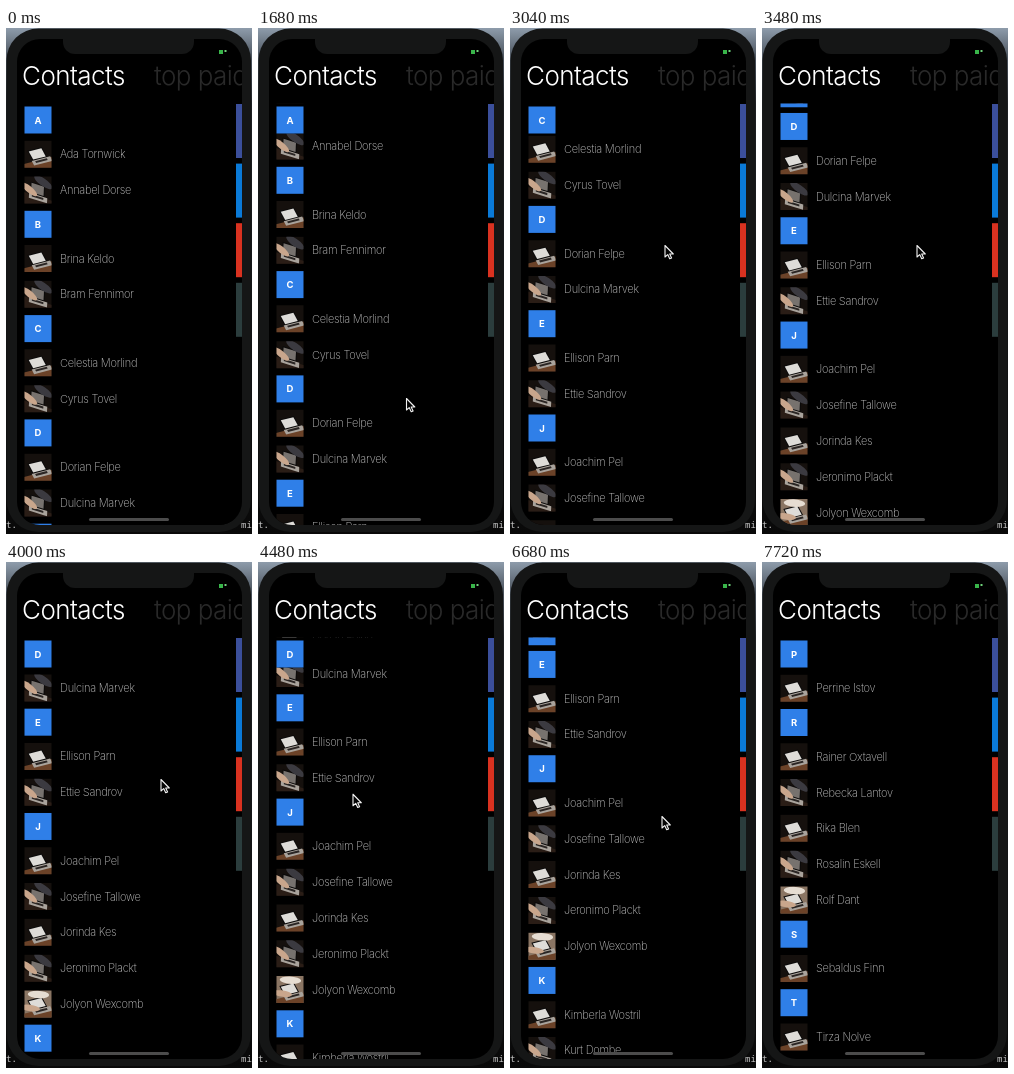
Write an HTML page with a canvas that moves like this. It is 246 px wide and 506 px high and loops after 8760 ms.

```html
<!DOCTYPE html>
<html lang="en">
<head>
<meta charset="utf-8">
<title>Contacts</title>
<style>
  html, body { margin: 0; width: 100%; height: 100%; overflow: hidden; background: #000; }
  canvas { display: block; width: 246px; height: 506px; }
</style>
</head>
<body>
<canvas id="stage" width="246" height="506"></canvas>
<script>
const ctx = document.getElementById('stage').getContext('2d');
const LOOP = 8760, STEP = 40;
const FONT = 'Inter, "Open Sans", sans-serif';
const BLUE = '#2f7fe8', BEZEL = '#151616';
const HEADER_H = 32.7, ROW_H = 35.8, TILE = 27, TILE_X = 18.5;
const LIST_TOP = 75.5, PIN_Y = 92;
const DRAG_END = 2990, GRID_OPEN = 5560, GRID_CLOSE = 6680;

const names = `Ada Tornwick,Annabel Dorse,Brina Keldo,Bram Fennimor,Celestia Morlind,Cyrus Tovel,
Dorian Felpe,Dulcina Marvek,Ellison Parn,Ettie Sandrov,Joachim Pel,Josefine Tallowe,Jorinda Kes,
Jeronimo Plackt,Jolyon Wexcomb,Kimberla Wostril,Kurt Dombe,Kyra Sempel,Lenora Vask,Linus Orrel,
Lyle Haddon,Mabel Trosk,Marek Undell,Mirela Foss,Myron Clabe,Nadia Wrell,Norris Keft,
Perrine Istov,Rainer Oxtavell,Rebecka Lantov,Rika Blen,Rosalin Eskell,Rolf Dant,
Sebaldus Finn,Tirza Nolve`.split(',').map(name => name.trim());

// Vertical centres of all headers and rows at scroll offset 0.
const headers = [], rows = [];
let nextTop = PIN_Y - HEADER_H / 2;
for (const name of names) {
  let group = headers[headers.length - 1];
  if (!group || group.letter !== name[0]) {
    group = { letter: name[0], y: nextTop + HEADER_H / 2, count: 0 };
    headers.push(group);
    nextTop += HEADER_H;
  }
  rows.push({ name, y: nextTop + ROW_H / 2, photo: group.count++ });
  nextTop += ROW_H;
}
const jumpOffset = headers.find(h => h.letter === 'P').y - PIN_Y;

const progress = (t, from, to) => Math.min(1, Math.max(0, (t - from) / (to - from)));
const smooth = x => x * x * (3 - 2 * x);
const mix = (a, b, x) => a + (b - a) * x;

// Pointer key points; each move eases in and out unless it says otherwise.
const pointer = [
  { t: 680, x: 88, y: 506 },
  { t: 920, x: 148, y: 420 },
  { t: 1400, x: 148, y: 420 },
  { t: 1680, x: 148, y: 370 },
  { t: DRAG_END, x: 154.5, y: 217, ease: x => x * x },
  { t: 4080, x: 154.5, y: 217 },
  { t: 4880, x: 34.5, y: 246.5 },
  { t: 5800, x: 34.5, y: 246.5 },
  { t: 6520, x: 151.5, y: 254 }
];

function pointerAt(t) {
  const i = pointer.findIndex(key => key.t > t);
  if (i < 1) return pointer[i < 0 ? pointer.length - 1 : 0];
  const a = pointer[i - 1], b = pointer[i];
  const p = (b.ease || smooth)(progress(t, a.t, b.t));
  return { x: mix(a.x, b.x, p), y: mix(a.y, b.y, p) };
}

// The list follows the drag, glides to rest, then jumps to a group.
function scrollOffset(t) {
  if (t < DRAG_END) return Math.max(0, 414 - pointerAt(t).y);
  const glide = 372.3 - 158.8 * Math.exp(-(Math.min(t, 5400) - 3040) / 500);
  return mix(glide, jumpOffset, smooth(progress(t, 6610, 7200)));
}

function rect(x, y, w, h, color) {
  ctx.fillStyle = color;
  ctx.fillRect(x, y, w, h);
}

function rounded(x, y, w, h, radius, color) {
  ctx.beginPath();
  ctx.roundRect(x, y, w, h, radius);
  ctx.fillStyle = color;
  ctx.fill();
}

function ellipse(x, y, rx, ry, angle, color) {
  ctx.beginPath();
  ctx.ellipse(x, y, rx, ry, angle, 0, 2 * Math.PI);
  ctx.fillStyle = color;
  ctx.fill();
}

function text(str, x, y, size, weight, color, spacing = 0, align = 'left') {
  ctx.font = `${weight} ${size}px ${FONT}`;
  ctx.letterSpacing = spacing + 'px';
  ctx.textAlign = align;
  ctx.fillStyle = color;
  ctx.fillText(str, x, y);
}

function clipped(addPath, paint) {
  ctx.save();
  ctx.beginPath();
  addPath();
  ctx.clip();
  paint();
  ctx.restore();
}

// A laptop on a wooden desk; odd kinds have hands on it, the last is brighter.
function drawPhoto(kind, x, y) {
  const hands = kind % 2 === 1, bright = kind === 4;
  clipped(() => ctx.rect(x, y, TILE, TILE), () => {
    ctx.translate(x + TILE / 2, y + TILE / 2);
    rect(-14, -14, 28, 28, bright ? '#8a7563' : '#15100d');
    ctx.rotate(hands ? 0.3 : -0.25);
    rect(-20, 6, 40, 14, hands ? '#2a1d16' : '#6b4228');
    ctx.transform(1, 0, 0.25, 1, 0, 0);
    rect(-8, -6, 15, 11, '#0b0a0a');
    rect(-7, -5, 13, 9, hands ? '#77726e' : '#dedcd8');
    rect(-9, 5, 19, 5, '#a9a39c');
    rect(-6, 6, 12, 2, '#2b2624');
    if (hands || bright) {
      ellipse(-9, 2, 9, 3.5, 0.4, '#c9a68c');
      ellipse(5, -9, 10, 4, 0.3, bright ? '#e6ddd2' : '#3b3a40');
    }
  });
}

function drawHeader(letter, y) {
  rect(12, y - 18, 217, 31.5, '#000');
  rect(TILE_X, y - TILE / 2, TILE, TILE, BLUE);
  text(letter, TILE_X + TILE / 2, y + 3.5, 9.5, 700, '#fff', 0, 'center');
}

function drawList(offset) {
  const visible = y => y > 40 && y < 520;
  clipped(() => ctx.rect(11, LIST_TOP, 225, 422), () => {
    for (const row of rows) {
      const y = row.y - offset;
      if (!visible(y)) continue;
      drawPhoto(row.photo, TILE_X, y - TILE / 2);
      text(row.name, 54, y + 4, 11, 200, '#c4c4c4', -0.25);
    }
    headers.forEach((header, i) => {
      const next = headers[i + 1];
      const limit = next ? next.y - offset - HEADER_H : Infinity;
      const y = Math.min(Math.max(header.y - offset, PIN_Y), limit);
      if (visible(y)) drawHeader(header.letter, y);
    });
  });
}

function drawJumpGrid(alpha) {
  ctx.globalAlpha = alpha;
  rect(11, 28, 225, 470, '#000');
  headers.forEach(({ letter }, i) => {
    const x = 18 + i % 4 * 54, y = 130 + Math.floor(i / 4) * 54;
    rect(x, y, 48, 48, BLUE);
    text(letter, x + 24, y + 30, 17, 600, '#fff', 0, 'center');
  });
  ctx.globalAlpha = 1;
}

function drawDesktop() {
  const shade = ctx.createLinearGradient(0, 0, 0, 506);
  shade.addColorStop(0, '#8e9cab');
  shade.addColorStop(0.06, '#4a525c');
  shade.addColorStop(0.15, '#1d1f22');
  shade.addColorStop(1, '#090909');
  rect(0, 0, 246, 506, shade);
  ctx.font = '9px "DejaVu Sans Mono", monospace';
  ctx.letterSpacing = '0px';
  ctx.textAlign = 'left';
  ctx.fillStyle = '#c8c8c8';
  ctx.fillText('t.', 0, 500);
  ctx.fillText('mi', 235, 500);
}

function drawScreen(t) {
  text('Contacts', 16, 57, 26, 350, '#fff', -0.55);
  text('top paid', 148, 57, 26, 350, '#292929', -0.55);
  drawList(scrollOffset(t));
  ['#3b4f9b', '#0a7ad8', '#d93220', '#2b3d3d'].forEach((color, i) =>
    rect(230, 76 + i * 59.6, 6, 54, color));
  if (t >= GRID_OPEN && t < GRID_CLOSE) drawJumpGrid(progress(t, GRID_OPEN - STEP, 5800));
  rounded(83, 490, 80, 3, 1.5, '#4c4c4c');
}

function drawPhone(t) {
  rounded(0.5, 0.5, 244.5, 503.5, 32, BEZEL);
  rounded(11, 11, 225, 486, 23, '#000');
  clipped(() => ctx.roundRect(11, 11, 225, 486, 23), () => drawScreen(t));
  rounded(57, 8, 131, 18, [0, 0, 12, 12], BEZEL);
  rect(213, 22, 4, 4, '#39b54a');
  rect(218.5, 22, 2, 2, '#6fd17a');
}

function drawCursor(t) {
  if (t < 720) return;
  const { x, y } = pointerAt(t);
  ctx.save();
  ctx.globalAlpha = 1 - progress(t, 7400, 7720);
  ctx.translate(x, y);
  ctx.lineJoin = 'round';
  const arrow = new Path2D('M.5 .5V12L3.2 9.6 5.2 13.8 7.1 13 5.2 9H8.8Z');
  ctx.fillStyle = '#050505';
  ctx.fill(arrow);
  ctx.strokeStyle = '#f2f2f2';
  ctx.lineWidth = 1.1;
  ctx.stroke(arrow);
  ctx.restore();
}

const start = performance.now();
function tick() {
  const t = Math.floor((performance.now() - start) % LOOP / STEP) * STEP;
  drawDesktop();
  drawPhone(t);
  drawCursor(t);
  requestAnimationFrame(tick);
}
tick();
</script>
</body>
</html>
```
